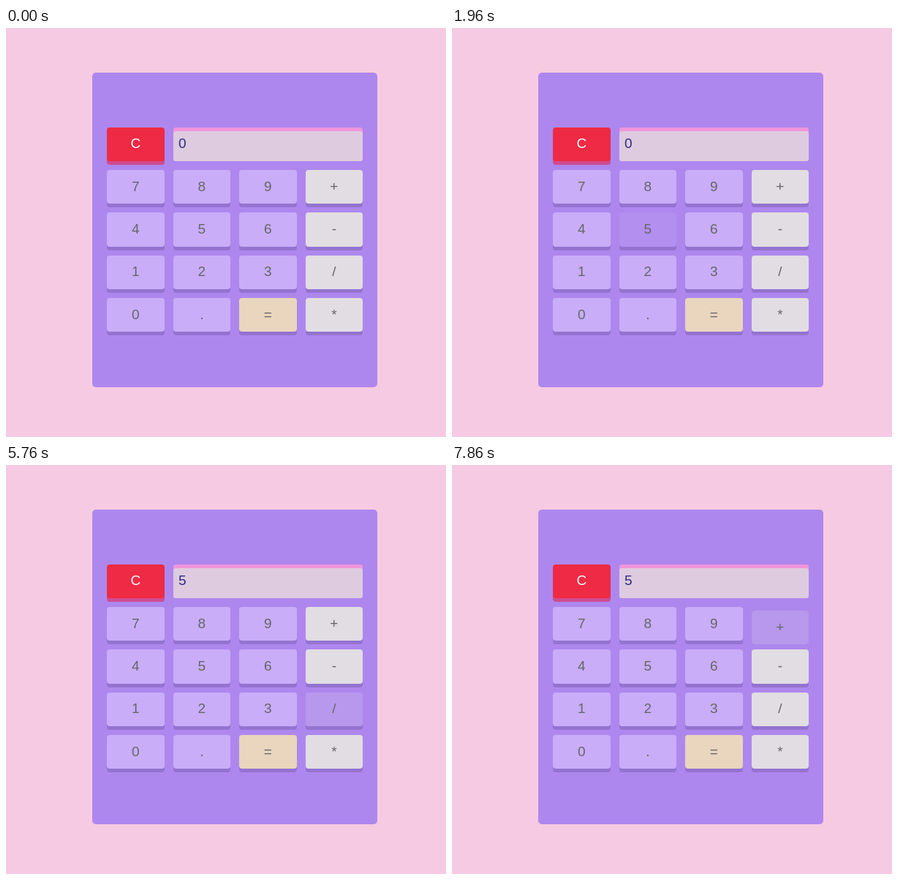
Animation of 602 by 559 pixels, one loop 8000 ms. Source, as an HTML page:

```html
<!DOCTYPE html>
<html lang="en">
<head>
<meta charset="utf-8">
<title>Calculator</title>
<style>
  html, body { margin: 0; width: 100%; height: 100%; overflow: hidden; background: #f6cae2; }
  svg { display: block; width: 602px; height: 559px; }
  text { font: 19px "Liberation Sans", Arial, sans-serif; fill: #666; }
</style>
</head>
<body>
<svg id="stage" viewBox="0 0 602 559"></svg>
<script>
const LOOP = 8000;
const PANEL = '#ae87ee';
const SHADE = '#9473d0';
const DIGIT = '#c9adf8';
const OPERATOR = '#e2dde3';
const DEPTH = 5;
const stage = document.getElementById('stage');

function add(tag, attrs, parent = stage) {
  const el = document.createElementNS('http://www.w3.org/2000/svg', tag);
  for (const name in attrs) el.setAttribute(name, attrs[name]);
  parent.appendChild(el);
  return el;
}

function box(x, y, width, height, rx, fill, parent) {
  return add('rect', { x, y, width, height, rx, fill }, parent);
}

function label(x, y, content, attrs, parent) {
  const el = add('text', { x, y, ...attrs }, parent);
  el.textContent = content;
  return el;
}

function mix(from, to, amount) {
  const channel = (hex, i) => parseInt(hex.slice(i, i + 2), 16);
  const parts = [1, 3, 5].map(i =>
    Math.round(channel(from, i) + (channel(to, i) - channel(from, i)) * amount));
  return `rgb(${parts})`;
}

const colX = col => 138.1 + 90.5 * col;
const rowY = row => 135.8 + 175 / 3 * row;

function makeKey(char, col, row, color, shade = SHADE, ink = '') {
  const x = Math.round(colX(col));
  const y = Math.round(rowY(row));
  const width = Math.round(colX(col) + 78.5) - x;
  const height = Math.round(rowY(row) + 46.35) - y;
  box(x, y + DEPTH, width, height, 4, shade);
  const cap = add('g', {});
  const face = box(x, y, width, height, 4, color, cap);
  const style = ink ? `fill:${ink}` : '';
  label(colX(col) + 39.25, Math.round(rowY(row) + 28.4), char,
    { 'text-anchor': 'middle', style }, cap);
  return { char, cap, face, color, faded: mix(PANEL, color, 0.2) };
}

box(118, 61, 390, 430, 5, PANEL);

// Display with an inset shadow along its top edge
box(229, 136, 259, 46, 3.5, '#f095dc');
add('path', { d: 'M229 144.5a3.5 3.5 0 0 1 3.5-3.5H484.5a3.5 3.5 0 0 1 3.5 3.5V178.5a3.5 3.5 0 0 1-3.5 3.5H232.5a3.5 3.5 0 0 1-3.5-3.5Z', fill: '#decbdf' });
const display = label(236, 164, '0', { style: 'fill:#2f2a80' });

const keys = [makeKey('C', 0, 0, '#ee2a44', '#cf4c8f', '#fff')];
['789+', '456-', '123/', '0.=*'].forEach((line, i) => {
  [...line].forEach((char, col) => {
    const color = char === '=' ? '#ead5be' : col === 3 ? OPERATOR : DIGIT;
    keys.push(makeKey(char, col, i + 1, color));
  });
});

// Pointer over a key: start and end in ms
const hovers = {
  'C': [720, 840],
  '8': [1260, 1660],
  '5': [1960, 4640],
  '3': [4740, 5020],
  '/': [5760, 6320],
  '-': [6420, 7140],
  '+': [7160, LOOP]
};

// Key travel: [time, offset]
const presses = {
  '5': [[2920, 2], [3060, 4], [3080, DEPTH], [4040, 0]],
  '+': [[7720, 2], [7840, 4], [7860, DEPTH]]
};

function travel(char, t) {
  let offset = 0;
  for (const [time, value] of presses[char] || []) if (t >= time) offset = value;
  return offset;
}

function draw(t) {
  for (const key of keys) {
    const span = hovers[key.char];
    const over = span && t >= span[0] && t < span[1];
    key.face.setAttribute('fill', over ? key.faded : key.color);
    key.cap.setAttribute('transform', `translate(0 ${travel(key.char, t)})`);
  }
  display.textContent = t < 4040 ? '0' : '5';
}

const start = performance.now();
function tick() {
  draw((performance.now() - start) % LOOP);
  requestAnimationFrame(tick);
}
draw(0);
requestAnimationFrame(tick);
</script>
</body>
</html>
```
